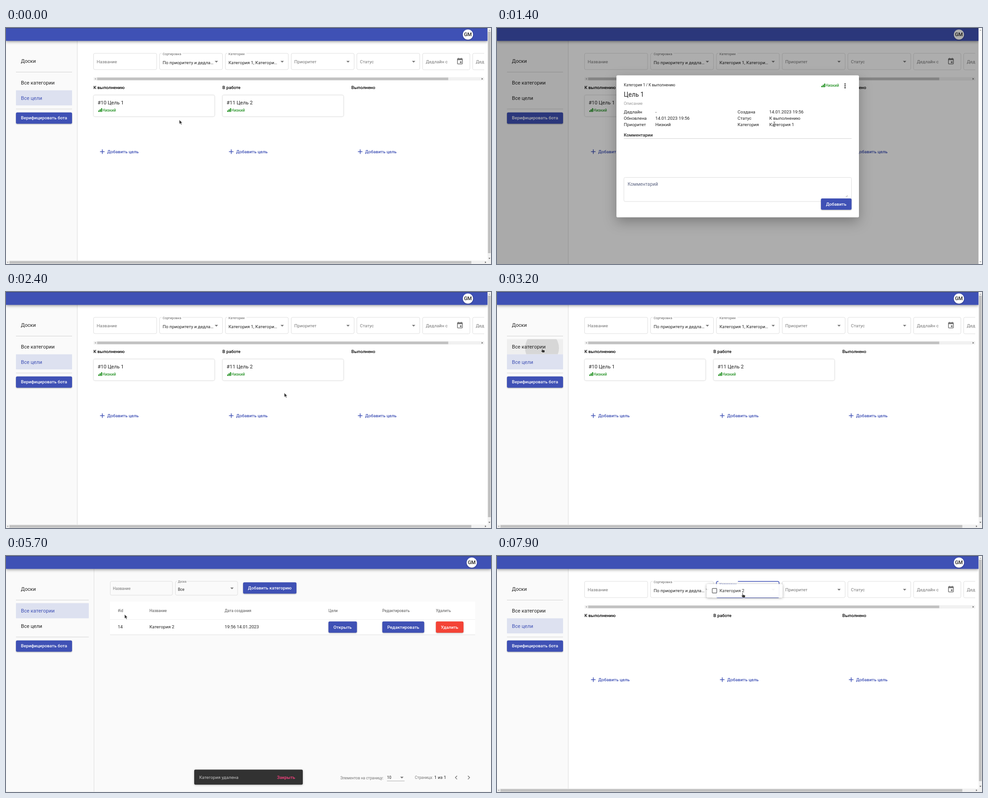
These frames come from a looping animation (1072x522 px, 8000 ms). An HTML page:

```html
<!DOCTYPE html>
<html lang="ru">
<head>
<meta charset="utf-8">
<style>
html, body { margin: 0; width: 100%; height: 100%; overflow: hidden; background: #fff; }
svg { display: block; width: 100%; height: 100%; }
text { font-family: Roboto, Arial, sans-serif; white-space: pre; }
.card { filter: drop-shadow(0 .7px 1px rgba(0,0,0,.14)); }
.lift { filter: drop-shadow(0 1.5px 2px rgba(0,0,0,.25)); }
.bar { filter: drop-shadow(0 2px 3px rgba(0,0,0,.38)); }
.btn { filter: drop-shadow(0 1.2px 1.2px rgba(0,0,0,.32)); }
.dialog { filter: drop-shadow(0 10px 14px rgba(0,0,0,.28)); }
.panel { filter: drop-shadow(0 1.5px 3px rgba(0,0,0,.35)); }
</style>
</head>
<body>
<svg id="stage" viewBox="0 0 1072 522"></svg>
<script>
const stage = document.getElementById('stage');
const LOOP = 8000, STEP = 100;
const BLUE = '#3f51b5', INK = '#212121', GREY = '#757575', LINE = '#dedede', GREEN = '#008000';
const S = 8.38, M = 9.77, L = 11.17;

// Time tracks: [time, value, ...] points joined by straight lines
function track(t, points) {
  if (t <= points[0][0]) return points[0].slice(1);
  for (let i = 1; i < points.length; i++) {
    const a = points[i - 1], b = points[i];
    if (t <= b[0]) {
      const k = (t - a[0]) / (b[0] - a[0]);
      return a.slice(1).map((v, j) => v + (b[j + 1] - v) * k);
    }
  }
  return points[points.length - 1].slice(1);
}
const between = (t, a, b) => t >= a && t < b;

// Drawing helpers
const text = (x, y, s, size = M, fill = INK, weight = 400) =>
  `<text x="${x}" y="${y}" font-size="${size}" fill="${fill}" font-weight="${weight}">${s}</text>`;
const rect = (x, y, w, h, fill, r = 0, more = '') =>
  `<rect x="${x}" y="${y}" width="${w}" height="${h}" rx="${r}" fill="${fill}" ${more}/>`;
const path = (d, fill, more = '') => `<path d="${d}" fill="${fill}" ${more}/>`;
const stroke = (d, color, width = 1) => path(d, 'none', `stroke="${color}" stroke-width="${width}"`);
const circle = (x, y, r, fill, more = '') => `<circle cx="${x}" cy="${y}" r="${r}" fill="${fill}" ${more}/>`;
const group = (body, more = '') => `<g ${more}>${body}</g>`;
const frame = (x, y, w, h, color = LINE, width = 1) =>
  rect(x, y, w, h, 'none', 3, `stroke="${color}" stroke-width="${width}"`);
const arrow = (x, y) => path(`M${x - 3.7} ${y - 1.8}h7.4l-3.7 3.7z`, GREY);
const button = (x, y, w, h, label, tx, fill = BLUE) =>
  rect(x, y, w, h, fill, 3, 'class="btn"') + text(tx, y + h / 2 + 3.2, label, M, '#fff', 500);

function priority(x, y, fill = GREEN) {
  const bars = [3, 5.5, 8].map((h, i) => rect(x + i * 3, y - h, 2, h, fill)).join('');
  return bars + text(x + 9, y - .8, 'Низкий', 8.6, fill);
}

function header(wide) {
  const w = wide ? 1072 : 1064.5, x = wide ? 1029.5 : 1021;
  return rect(0, 0, w, 28.5, BLUE, 0, 'class="bar"') + rect(0, 0, w, .8, '#36406f') +
    circle(x, 14.5, 11.3, '#fff', 'class="btn"') + text(x - 8.8, 18.3, 'GM', L, INK, 500);
}

function sidebar(width, active, hover, ripple) {
  const right = width - 11.5;
  const item = (i, y, label) => {
    const on = active === i;
    const back = on ? '#dde1f0' : hover === i ? '#efefef' : 'none';
    return rect(22, y, right - 22, 33.5, back, 1) +
      (ripple && ripple.item === i
        ? group(circle(99.5, 124, ripple.r, '#000', `opacity="${ripple.alpha}"`), 'clip-path="url(#item)"') : '') +
      text(33, y + 20.7, label, L, on ? BLUE : INK);
  };
  return rect(0, 28, width, 494, '#fafafa') + rect(width - .5, 28, 1, 494, '#dcdcdc') +
    text(33, 77, 'Доски', L) +
    rect(22, 97, right - 22, .9, '#cfcfcf') +
    item(0, 104.3, 'Все категории') + item(1, 137.8, 'Все цели') +
    rect(22, 178.7, right - 22, .9, '#cfcfcf') +
    button(22, 186.7, 124, 25, 'Верифицировать бота', 33);
}

function scrollbars(locked) {
  const tip = (d, fill = '#505050') => path(d, fill);
  if (locked) {
    return rect(1064.5, 0, 7.5, 522, '#fafafa') + tip('M1066.5 6h4l-2-2.6z', '#a3a3a3') +
      tip('M1066.5 516h4l-2 2.6z', '#a3a3a3');
  }
  return rect(1064.5, 0, 7.5, 522, '#f1f1f1') + rect(1065.2, 8, 6, 490, '#c1c1c1') +
    tip('M1066.5 6h4l-2-2.6z', '#a3a3a3') + tip('M1066.5 508.5h4l-2 2.6z') +
    rect(0, 514.5, 1064.5, 7.5, '#f1f1f1') + rect(7.5, 515.4, 1021, 6, '#c1c1c1') +
    tip('M4.8 516.3v4l-2.6-2z', '#a3a3a3') + tip('M1058.8 516.3v4l2.6-2z');
}

function select(x, label, value, labelWidth) {
  let out = frame(x + .5, 56, 139, 36);
  if (!value) return out + text(x + 7.3, 77.5, label, M, GREY) + arrow(x + 126, 74.5);
  return out + rect(x + 5, 55, labelWidth, 2, '#fff') + text(x + 7.3, 60, label, 7.33, '#666') +
    text(x + 7.3, 80, value) + arrow(x + 126, 74.5);
}

function categorySelect(t) {
  if (t < 6500) return select(484.5, 'Категории', 'Категория 1, Категори…', 42);
  if (t < 7700) return select(484.5, 'Категории');
  const [y, size] = track(t, [[7700, 77.5, M], [7900, 65, 7.8], [8000, 60, 7.33]]);
  return frame(485, 56.3, 138.5, 36, BLUE, 1.4) + rect(489.5, 55, 43, 3, '#fff') +
    text(491.8, y, 'Категории', size, BLUE) + arrow(610.5, 74.5);
}

function filters(t) {
  const calendar = rect(997.8, 68, 11, 11.5, 'none', 1.2, `stroke="${GREY}" stroke-width="1.5"`) +
    rect(997.5, 67.5, 11.5, 3.6, GREY) + rect(999.5, 66, 1.5, 2, GREY) + rect(1005.5, 66, 1.5, 2, GREY) +
    rect(1003.3, 73.8, 3.6, 3.6, GREY);
  const fields = frame(193.5, 56, 139.5, 36) + text(200.6, 77.5, 'Название', M, GREY) +
    select(339, 'Сортировка', 'По приоритету и дедла…', 46) + categorySelect(t) +
    select(630, 'Приоритет') + select(775, 'Статус') +
    frame(920.8, 56, 104.5, 36.5) + text(928, 77.5, 'Дедлайн с', M, GREY) + calendar +
    frame(1031.5, 56, 105, 36.5) + text(1038.5, 77.5, 'Дедлайн по', M, GREY);
  return group(fields, 'clip-path="url(#filters)"') +
    rect(193.5, 108.8, 863.5, 7.4, '#f1f1f1') + rect(201.5, 109.6, 776, 5.8, '#c1c1c1') +
    path('M198.6 110.5v4l-2.6-2z', '#a3a3a3') + path('M1051.5 110.5v4l2.6-2z', '#505050');
}

function goalCard(x, title, hover) {
  const pencil = circle(x + 253.5, 163, 10.3, BLUE, 'class="btn"') +
    path(`M${x + 250} 166.7v-2l5.2-5.2 2 2-5.2 5.2z`, '#fff');
  return rect(x + .5, 148.5, 267.5, 47.3, '#fff', 3, `class="${hover ? 'lift' : 'card'}" stroke="#e2e2e2" stroke-width=".8"`) +
    text(x + 9.5, 168.5, title, L) + priority(x + 11, 185.5) + (hover ? pencil : '');
}

function board(t) {
  const names = ['К выполнению', 'В работе', 'Выполнено'];
  const columns = names.map((name, i) => {
    const x = 193.3 + i * 285;
    return text(x, 135.3, name, M, '#000', 500) +
      stroke(`M${x + 14.5} 273.5h10M${x + 19.5} 268.5v10`, BLUE, 1.5) +
      text(x + 30.4, 277, 'Добавить цель', M, BLUE, 500);
  }).join('');
  const cards = t < 6000
    ? goalCard(193, '#10 Цель 1', between(t, 200, 1000)) + goalCard(478, '#11 Цель 2') : '';
  return filters(t) + columns + cards;
}

function goalsPage(t) {
  const modal = between(t, 400, 2400);
  const hover = between(t, 3000, 3400) ? 0 : -1;
  const [r, alpha] = track(t, [[3100, 20, .1], [3200, 37.5, .1], [3300, 60, .08]]);
  const ripple = between(t, 3100, 3400) ? { item: 0, r, alpha } : null;
  const loaded = t < 6000 || t >= 6800;
  return rect(0, 0, 1072, 522, '#fff') + sidebar(157.5, modal ? -1 : 1, hover, ripple) +
    (loaded ? board(t) : '') + header(false) + (modal ? veil(t) + dialog(t) : '') + scrollbars(modal);
}

function veil(t) {
  const [alpha] = track(t, [[400, .03], [500, .11], [600, .22], [700, .29], [800, .32],
    [2100, .32], [2200, .25], [2300, .1], [2400, 0]]);
  return rect(0, 0, 1064.5, 522, '#000', 0, `opacity="${alpha}"`);
}

function loader(t) {
  const a = t / 1000 * Math.PI * 2 - Math.PI + .17;
  const x = 532 + 32 * Math.cos(a), y = 262 + 32 * Math.sin(a);
  return rect(280.5, 121.5, 503, 280, '#000', 0, 'opacity=".32"') +
    rect(x - 4, y - 5, 8, 10, '#4a6cf0', 0, `transform="rotate(8 ${x} ${y})"`);
}

function commentField(t) {
  const focus = t < 1300;
  const [y, size] = track(t, [[1300, 333.5, 8.38], [1400, 349, 10.3], [1500, 355, L]]);
  const label = t < 1500 ? (focus ? BLUE : '#5f6784') : GREY;
  return frame(280.5, 330.5, 503, 53.3, focus ? BLUE : LINE, focus ? 1.4 : 1) +
    (focus ? rect(286.5, 329, 59, 3, '#fff') : '') + text(288.7, y, 'Комментарий', size, label) +
    stroke('M770.5 374.5l4.5-4.5M773 374.5l2-2', '#888', .8);
}

function details(t) {
  const rows = [
    ['Дедлайн', '-', 'Создана', '14.01.2023 19:56'],
    ['Обновлена', '14.01.2023 19:56', 'Статус', 'К выполнению'],
    ['Приоритет', 'Низкий', 'Категория', 'Категория 1'],
  ];
  const picked = t >= 1600;
  const xs = [280.3, 350, 531.8, 601.7];
  const table = rows.map((row, i) => row.map((s, j) =>
    text(xs[j], 189.4 + i * 14, s, M, picked && i === 2 && j === 3 ? '#fff' : INK)).join('')).join('');
  return text(280.3, 129.2, 'Категория 1 / К выполнению', S) + priority(717, 131) +
    [123.8, 128, 132.2].map(y => circle(769.3, y, 1.4, INK)).join('') +
    text(280.3, 152.3, 'Цель 1', 13.96) + text(280.3, 169.8, 'Описание', 9.07, '#9a9a9a') +
    (picked ? rect(601.7, 208, 55.3, 11.5, '#0d5757') : '') + table +
    text(280.3, 239.6, 'Комментарии', M, INK, 500) + rect(280.3, 244, 503.5, .9, '#cfcfcf') +
    commentField(t) + button(716, 377, 67.7, 25, 'Добавить', 727.2);
}

function dialog(t) {
  const [alpha, scale] = track(t, [[400, 0, .7], [500, .65, .883], [600, 1, 1],
    [2100, 1, 1], [2200, .43, 1], [2300, 0, 1]]);
  const body = rect(264, 104.7, 536, 314, '#fff', 2.8, 'class="dialog"') + (t < 800 ? loader(t) : details(t));
  return group(body, `opacity="${alpha}" transform="translate(532 262) scale(${scale}) translate(-532 -262)"`);
}

function categoryRow(y, id, name) {
  return rect(230, y, 807, 33.5, '#fff') + rect(230, y + 33.2, 807, .9, '#dcdcdc') +
    text(247, y + 19.8, id) + text(317, y + 19.8, name) + text(483.3, y + 19.8, '19:56 14.01.2023') +
    button(712.7, y + 4.3, 63, 25, 'Открыть', 723.7) +
    button(831.7, y + 4.3, 92.7, 25, 'Редактировать', 842.7) +
    button(950.2, y + 4.3, 61, 25, 'Удалить', 961.2, '#f44336');
}

function snackbar(t) {
  if (!between(t, 5200, 7000)) return '';
  const [alpha, scale] = track(t, [[5200, .6, .9], [5300, 1, 1], [6800, 1, 1], [6900, .4, 1]]);
  const body = rect(416, 472.5, 240, 33.3, '#323232', 2.8, 'class="lift"') +
    text(427, 492.6, 'Категория удалена', M, '#c4c4c4') + text(599, 492.6, 'Закрыть', M, '#ff4081', 500);
  return group(body, `opacity="${alpha}" transform="translate(536 489) scale(${scale}) translate(-536 -489)"`);
}

function categoriesPage(t) {
  const deleted = t >= 5100;
  const heads = [[247, '#id'], [317, 'Название'], [483.3, 'Дата создания'], [712.7, 'Цели'],
    [831.7, 'Редактировать'], [950.2, 'Удалить']];
  const rows = deleted ? ['14', 'Категория 2'] : ['13', 'Категория 1'];
  const hover = between(t, 6000, 6500) ? 1 : -1;
  return rect(0, 0, 1072, 522, '#fafafa') + sidebar(194.5, 0, hover) +
    frame(230.5, 56, 137.5, 30.7) + text(236.3, 74.5, 'Название', 8.55, GREY) +
    frame(374.5, 56, 137.5, 30.7) + rect(378, 55, 22, 2, '#fafafa') +
    text(380, 59.3, 'Доска', 6.4, '#666') + text(380, 76.6, 'Все', 8.55) + arrow(499.5, 71.5) +
    button(524, 58.2, 118, 25, 'Добавить категорию', 534.8) +
    rect(230, 101, 807, 39.3, '#fff') + rect(230, 140, 807, .9, '#dcdcdc') +
    heads.map(([x, s]) => text(x, 123.6, s, S, GREY, 500)).join('') +
    categoryRow(140.5, ...rows) + (deleted ? '' : categoryRow(174.2, '14', 'Категория 2')) +
    text(738.7, 494, 'Элементов на страницу:', S, GREY) + text(842.2, 493, '10', S) + arrow(875, 490) +
    rect(842, 497.3, 39, .8, '#9a9a9a') +
    text(903.7, 492.5, 'Страница:', S, GREY) + text(946.5, 493.3, '1 из 1', M) +
    stroke('M997 486.3l-3.8 3.8 3.8 3.8M1021 486.3l3.8 3.8-3.8 3.8', '#666', 1.3) +
    rect(0, 521, 1072, 1, '#eeeeee') + header(true);
}

function optionPanel(t) {
  if (t < 7800) return '';
  const [alpha, scale] = track(t, [[7800, .4, .87], [7900, .93, 1]]);
  const body = rect(463.3, 62, 168, 30, '#fff', 2.8, 'class="panel"') +
    rect(475.7, 71.8, 10, 10, 'none', 1, 'stroke="#666" stroke-width="1.4"') + text(491.8, 80.4, 'Категория 2');
  return group(body, `opacity="${alpha}" transform="translate(0 77) scale(1 ${scale}) translate(0 -77)"`);
}

const route = [
  [0, 383, 203], [100, 381, 197], [300, 370, 170], [400, 367, 165], [600, 367, 165], [900, 520, 212],
  [1300, 613, 213], [1500, 613, 213], [1800, 617, 216], [2100, 615, 223], [2500, 615, 223],
  [2700, 480, 205], [2900, 210, 148], [3000, 112, 127], [3100, 100, 123], [3400, 100, 123],
  [3600, 180, 165], [3900, 620, 230], [4100, 890, 180], [4300, 987, 125], [4400, 994, 112],
  [4700, 985, 150], [5200, 985, 150], [5400, 720, 100], [5700, 262, 129], [5900, 130, 148],
  [6100, 75, 153], [6700, 75, 153], [7000, 240, 110], [7300, 480, 82], [7500, 543, 81],
];

function cursor(t) {
  const [x, y] = track(t, route);
  const at = `transform="translate(${x} ${y})"`;
  const edge = 'stroke="#fff" stroke-width=".7" stroke-linejoin="round"';
  const hand = between(t, 3000, 3500) || between(t, 4600, 5200) || between(t, 6000, 6900) || t >= 7300;
  if (between(t, 900, 1900)) {
    return group(stroke('M-2 -5h1.4l.6.6.6-.6h1.4M0 -4.4v8.8M-2 5h1.4l.6-.6.6.6h1.4', '#444', 1), at);
  }
  if (hand) {
    return group(path('M-1 .5q1-1 1.7.2v4l3.8.8q1.6.5 1.4 2l-.7 3.5H.2L-3.2 7q.3-1.5 2.2-.1z', '#333', edge), at);
  }
  return group(path('M0 0v9.6l2.2-2 1.7 3.5 1.7-.8-1.6-3.4h3z', '#333', edge), at);
}

const defs = `<defs><clipPath id="filters">${rect(190, 50, 867, 55, '#000')}</clipPath>` +
  `<clipPath id="item">${rect(22, 104.3, 124, 33.5, '#000')}</clipPath></defs>`;

function draw(t) {
  const page = between(t, 3400, 6500) ? categoriesPage(t) : goalsPage(t);
  stage.innerHTML = defs + page + snackbar(t) + optionPanel(t) + cursor(t);
}

let shown = -1;
function tick() {
  const t = Math.floor(performance.now() % LOOP / STEP) * STEP;
  if (t !== shown) draw(shown = t);
  requestAnimationFrame(tick);
}
tick();
</script>
</body>
</html>
```
